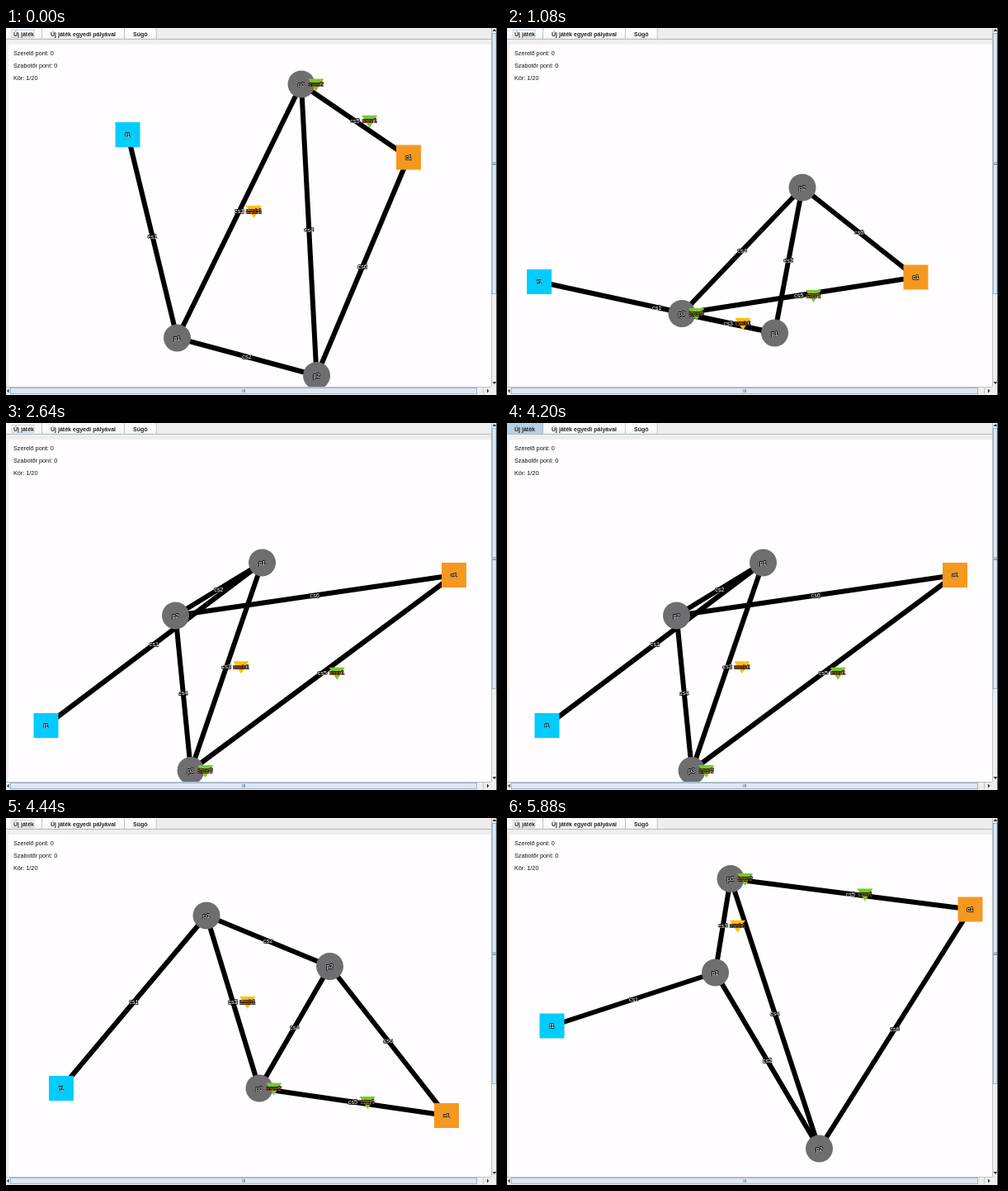
Animation of 600x444 px, one loop 6960 ms. Source, as an HTML page with a canvas:

```html
<!DOCTYPE html>
<html lang="hu">
<head>
<meta charset="utf-8">
<style>
  html, body { margin: 0; width: 100%; height: 100%; overflow: hidden; background: #eee; }
  canvas { display: block; }
</style>
</head>
<body>
<canvas id="stage" width="600" height="444"></canvas>
<script>
const ctx = document.getElementById('stage').getContext('2d');
const FONT = '"Liberation Sans", Arial, sans-serif';
const LOOP = 6960;

const layouts = [
  { f1: [147.5, 129], p1: [207.5, 375], p2: [376.5, 420.5], p3: [358, 68], c1: [488, 156.5] },
  { f1: [39, 307], p1: [324.5, 369], p2: [358, 193], p3: [212, 345.5], c1: [495.5, 301.5] },
  { f1: [48.5, 366], p1: [310.5, 169], p2: [205.5, 233], p3: [224, 420.5], c1: [543, 184] },
  { f1: [67, 327], p1: [243, 118], p2: [392.5, 179.5], p3: [307, 327], c1: [534, 360] },
  { f1: [54.5, 251.5], p1: [252.5, 187], p2: [378.5, 400], p3: [271, 73.5], c1: [561.5, 110.5] }
];
const pipes = {
  cs1: ['f1', 'p1'], cs2: ['p1', 'p2'], cs3: ['p1', 'p3'],
  cs4: ['p3', 'p2'], cs5: ['p3', 'c1'], cs6: ['p2', 'c1']
};
const players = [
  ['szer2', 'p3', '#7dc52d', '#c07a30'],
  ['szer1', 'cs5', '#7dc52d', '#c07a30'],
  ['szab1', 'cs3', '#ffc000', '#d8561c']
];
// [start, layout, button pressed]
const steps = [
  [0, 0, false], [840, 0, true], [960, 1, true], [1080, 1, false],
  [2520, 1, true], [2640, 2, false],
  [4200, 2, true], [4320, 3, true], [4440, 3, false],
  [5760, 3, true], [5880, 4, false]
];

function rect(x, y, w, h, color) {
  ctx.fillStyle = color;
  ctx.fillRect(x, y, w, h);
}

function polygon(color, ...points) {
  ctx.fillStyle = color;
  ctx.beginPath();
  points.forEach(p => ctx.lineTo(...p));
  ctx.fill();
}

function text(str, x, y, align = 'left', font = '7.25px', color = '#111') {
  ctx.font = `${font} ${FONT}`;
  ctx.textAlign = align;
  ctx.fillStyle = color;
  ctx.fillText(str, x, y);
}

function label(str, [x, y], color = '#fff') {
  for (const [dx, dy] of [[-.6, -.6], [.6, -.6], [-.6, .6], [.6, .6]])
    text(str, x + dx, y + 2.5 + dy, 'center', '7.25px', '#000');
  text(str, x, y + 2.5, 'center', '7.25px', color);
}

function button(str, x, w, pressed) {
  const shade = ctx.createLinearGradient(0, 0, 0, 14);
  shade.addColorStop(0, '#f4f6f9');
  shade.addColorStop(.4, '#fff');
  shade.addColorStop(1, '#eef2f6');
  rect(x, 0, w, 13, pressed ? '#b8cfe5' : shade);
  rect(x + w - .7, 0, .7, 13, '#a4adb6');
  text(str, x + w / 2 - .5, 9.5, 'center', 'bold 7.05px', '#222');
}

function drawChrome(pressed) {
  rect(0, 0, 600, 444, '#eee');
  rect(3, 20, 585, 414, '#fffdff');
  button('Új játék', 0, 44, pressed);
  button('Új játék egyedi pályával', 44, 100);
  button('Súgó', 144, 38.5);
  rect(0, 13, 588, 1, '#b4b8bc');
  if (!pressed) {
    ctx.strokeStyle = '#a3b8cc';
    ctx.lineWidth = .6;
    ctx.strokeRect(7, 2.5, 27, 9);
  }
  ['Szerelő pont: 0', 'Szabotőr pont: 0', 'Kör: 1/20']
    .forEach((line, i) => text(line, 9, 32.5 + 15 * i));
}

function thumb(x, y, w, h) {
  rect(x, y, w, h, '#7f9dbd');
  rect(x + .7, y + .7, w - 1.4, h - 1.4, '#dce8f4');
}

function drawScrollbars() {
  rect(0, 434, 595, 10, '#eee');
  rect(0, 434, 588, .6, '#9aa6b2');
  thumb(5, 435, 566, 8);
  rect(578.5, 435, .6, 8, '#9aa6b2');
  polygon('#333', [1, 439], [3.5, 436.5], [3.5, 441.5]);
  polygon('#333', [585.5, 439], [583, 436.5], [583, 441.5]);

  rect(588, 0, 7, 434, '#eee');
  rect(588, 0, .6, 434, '#9aa6b2');
  thumb(589, 6, 5.5, 316);
  polygon('#333', [592, 1], [589.5, 4], [594.5, 4]);
  polygon('#333', [592, 431], [589.5, 428], [594.5, 428]);
  for (let i = 0; i < 3; i++) {
    rect(286.5 + i * 1.4, 437, .7, 4, '#6382a3');
    rect(590, 162.5 + i * 1.4, 4, .7, '#6382a3');
  }
  rect(594.5, 0, 5.5, 444, '#000');
}

function drawNetwork(nodes) {
  const places = { ...nodes };
  ctx.strokeStyle = '#000';
  ctx.lineWidth = 6;
  for (const [name, [a, b]] of Object.entries(pipes)) {
    const [from, to] = [nodes[a], nodes[b]];
    ctx.beginPath();
    ctx.moveTo(...from);
    ctx.lineTo(...to);
    ctx.stroke();
    places[name] = [(from[0] + to[0]) / 2, (from[1] + to[1]) / 2];
  }
  for (const [name, [x, y]] of Object.entries(nodes)) {
    if (name[0] === 'p') {
      ctx.fillStyle = '#6e6e70';
      ctx.beginPath();
      ctx.arc(x, y, 16.5, 0, 2 * Math.PI);
      ctx.fill();
    } else {
      rect(x - 15, y - 15, 30, 30, name === 'f1' ? '#00ccff' : '#f59820');
    }
  }
  for (const name in places) label(name, places[name]);
  for (const [name, place, color, ink] of players) {
    const x = places[place][0] + 17.7, y = places[place][1];
    polygon(color, [x - 9.5, y - 6.5], [x + 9.5, y - 6.5], [x, y + 8.5]);
    label(name, [x, y], ink);
  }
}

function draw(now) {
  const t = now % LOOP;
  const [, layout, pressed] = steps.findLast(step => step[0] <= t);
  drawChrome(pressed);
  drawNetwork(layouts[layout]);
  drawScrollbars();
  requestAnimationFrame(draw);
}
draw(0);
</script>
</body>
</html>
```
